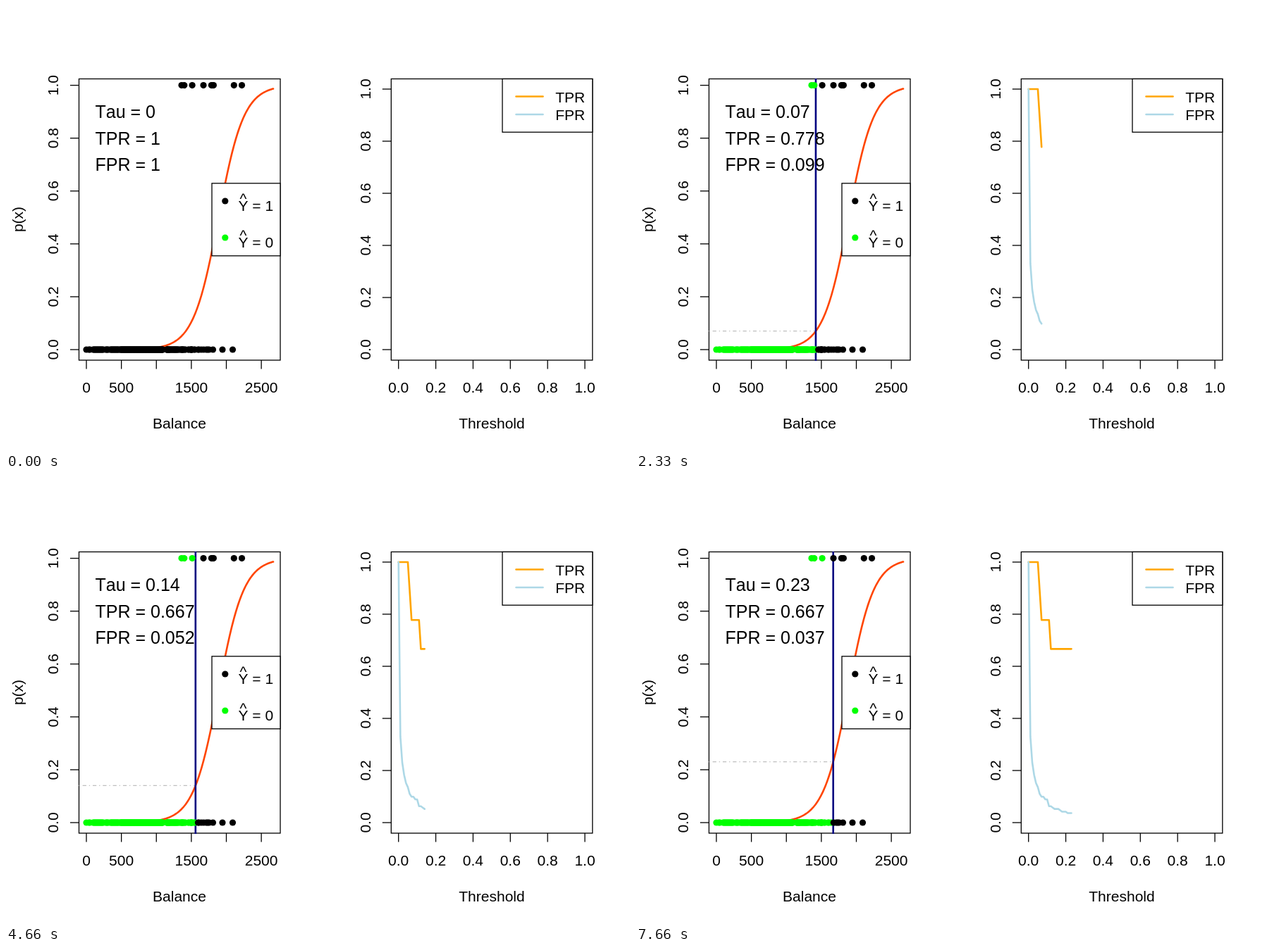
Write an HTML page that moves like this. It is 885 px wide and 632 px high and loops after 7990 ms.

```html
<!DOCTYPE html>
<html lang="en">
<head>
<meta charset="utf-8">
<title>Threshold and error rates</title>
<style>
  html, body { margin: 0; width: 100%; height: 100%; overflow: hidden; background: #fff; }
  svg { display: block; width: 885px; height: 632px; }
  text { font: 21px "Liberation Sans", Arial, sans-serif; font-kerning: none; fill: #000; }
  .big { font-size: 25px; }
  .mid { text-anchor: middle; }
  .frame { fill: none; stroke: #000; stroke-width: 1.3; }
  .legend { fill: #fff; }
  .line { fill: none; stroke-width: 2.6; stroke-linecap: round; stroke-linejoin: round; }
</style>
</head>
<body>
<svg id="stage" viewBox="0 0 885 632"></svg>
<script>
const stage = document.getElementById('stage');
const LOOP = 7990, STEPS = 24;
const BLACK = '#000', GREEN = '#00ff00', ORANGE = '#ffa500', BLUE = '#add8e6';

// Logistic curve in pixel space
const SLOPE = 0.0557, CENTER = 301.4;
const curveAt = x => 1 / (1 + Math.exp(-SLOPE * (x - CENTER)));
const cutoff = p => p > 0 ? CENTER + Math.log(p / (1 - p)) / SLOPE : -Infinity;

const leftX = v => 114 + v * 0.09925;
const leftY = v => 488 - v * 375.4;
const rightX = v => 556.7 + v * 264.3;
const rightY = v => 488 - v * 370;

const positives = [249, 252.8, 264.1, 280, 291.4, 292.8, 294.4, 323.3, 334.5];
// Runs of evenly spaced points: start, end, count
const runs = [
  [114, 114, 1], [117.5, 119, 2], [123.5, 138, 14], [141.5, 145, 4], [148, 160, 13],
  [162, 218.5, 94], [219.2, 222.3, 9], [228, 231.2, 10], [232, 238.8, 9], [239.4, 243.6, 6],
  [244.7, 248.2, 3], [249, 251.6, 5], [253.3, 254.6, 2], [258.6, 259.6, 2], [262.3, 263.6, 5],
  [266.5, 268, 2], [272.4, 273.6, 2], [277, 277, 1], [280.3, 280.3, 1], [284, 288, 3],
  [293.5, 293.5, 1], [307, 307, 1], [321.5, 321.5, 1]
];
const negatives = runs.flatMap(([a, b, n]) =>
  Array.from({ length: n }, (_, i) => n > 1 ? a + (b - a) * i / (n - 1) : a));

function add(tag, attrs, content) {
  const el = document.createElementNS('http://www.w3.org/2000/svg', tag);
  for (const key in attrs) el.setAttribute(key, attrs[key]);
  if (content !== undefined) el.textContent = content;
  return stage.appendChild(el);
}
const label = (x, y, s, cls = '') => add('text', { x, y, class: cls }, s);
const upright = (x, y, s) =>
  add('text', { class: 'mid', transform: `translate(${x} ${y}) rotate(-90)` }, s);
const path = (d, cls, stroke) => add('path', { d, class: cls, ...(stroke && { stroke }) });
const box = (x, y, w, h, cls) => add('rect', { x, y, width: w, height: h, class: cls });
const dot = (cx, cy, fill = BLACK) => add('circle', { cx, cy, r: 4.6, fill });

function axes(left, xTicks, toX, toY, xName, nameX) {
  box(left, 103.5, 285.5, 399.5, 'frame');
  for (const [v, s] of xTicks) {
    path(`M${toX(v)} 503v12.5`, 'frame');
    label(toX(v), 549, s, 'mid');
  }
  for (let i = 0; i <= 5; i++) {
    const y = toY(i / 5);
    path(`M${left} ${y}h-12.5`, 'frame');
    upright(left - 29.5, y, (i / 5).toFixed(1));
  }
  label(nameX, 600, xName, 'mid');
}

const balanceTicks = [0, 500, 1000, 1500, 2000, 2500].map(v => [v, v % 1000 || !v ? v : '']);
balanceTicks[5][1] = 2500;
const rateTicks = [0, 1, 2, 3, 4, 5].map(i => [i / 5, (i / 5).toFixed(1)]);

axes(103.5, balanceTicks, leftX, leftY, 'Balance', 246);
upright(24, 303, 'p(x)');
axes(546.3, rateTicks, rightX, rightY, 'Threshold', 689);

let curve = '';
for (let x = 114; x <= 379; x++) curve += (curve ? 'L' : 'M') + x + ' ' + leftY(curveAt(x)).toFixed(2);
path(curve, 'line', '#ff4500');

const level = add('path', { fill: 'none', stroke: '#bebebe', 'stroke-width': 1.3, 'stroke-dasharray': '1.3 3.9 5.2 3.9' });
const divider = add('path', { fill: 'none', stroke: '#000080', 'stroke-width': 2.6 });
const dots = [
  ...negatives.map(x => ({ x, el: dot(x, leftY(0)) })),
  ...positives.map(x => ({ x, el: dot(x, leftY(1)) }))
];

box(292, 251.8, 97, 103, 'frame legend').style.fill = '#fff';
[[277, BLACK, 1], [329, GREEN, 0]].forEach(([y, color, n]) => {
  dot(310.8, y, color);
  label(329.5, y + 14, 'Y = ' + n);
  label(331.6, y + 4, '^');
});

const readout = [159, 196.5, 234].map(y => label(126.5, y, '', 'big'));

const tprLine = path('', 'line', ORANGE);
const fprLine = path('', 'line', BLUE);
box(704, 103.5, 127.8, 75.7, 'frame').style.fill = '#fff';
[['TPR', 128.5, ORANGE], ['FPR', 154, BLUE]].forEach(([name, y, color]) => {
  path(`M723.5 ${y}H761.5`, 'line', color);
  label(779.2, y + 8.3, name);
});

const share = (points, x) => points.filter(p => p >= x).length / points.length;
const rates = Array.from({ length: STEPS }, (_, k) => {
  const x = cutoff(k / 100);
  return { x, tau: k / 100, tpr: share(positives, x), fpr: share(negatives, x) };
});
const trace = (k, key) => k ? 'M' + rates.slice(0, k + 1)
  .map(r => rightX(r.tau).toFixed(2) + ' ' + rightY(r[key]).toFixed(2)).join('L') : '';

function draw(k) {
  const { x, tau, tpr, fpr } = rates[k];
  level.setAttribute('d', k ? `M103.5 ${leftY(tau)}H${x}` : '');
  divider.setAttribute('d', k ? `M${x} 103V504` : '');
  for (const d of dots) d.el.setAttribute('fill', d.x >= x ? BLACK : GREEN);
  [['Tau', tau], ['TPR', tpr], ['FPR', fpr]].forEach(([name, v], i) => {
    readout[i].textContent = name + ' = ' + Number(v.toFixed(3));
  });
  tprLine.setAttribute('d', trace(k, 'tpr'));
  fprLine.setAttribute('d', trace(k, 'fpr'));
}

// Step starts are rounded to hundredths of a second
const startOf = k => 10 * Math.round(333 * k / 10);
let shown = -1;
const began = performance.now();
function tick() {
  const t = (performance.now() - began) % LOOP;
  let k = STEPS - 1;
  while (k > 0 && startOf(k) > t) k--;
  if (k !== shown) draw(shown = k);
  requestAnimationFrame(tick);
}
tick();
</script>
</body>
</html>
```
